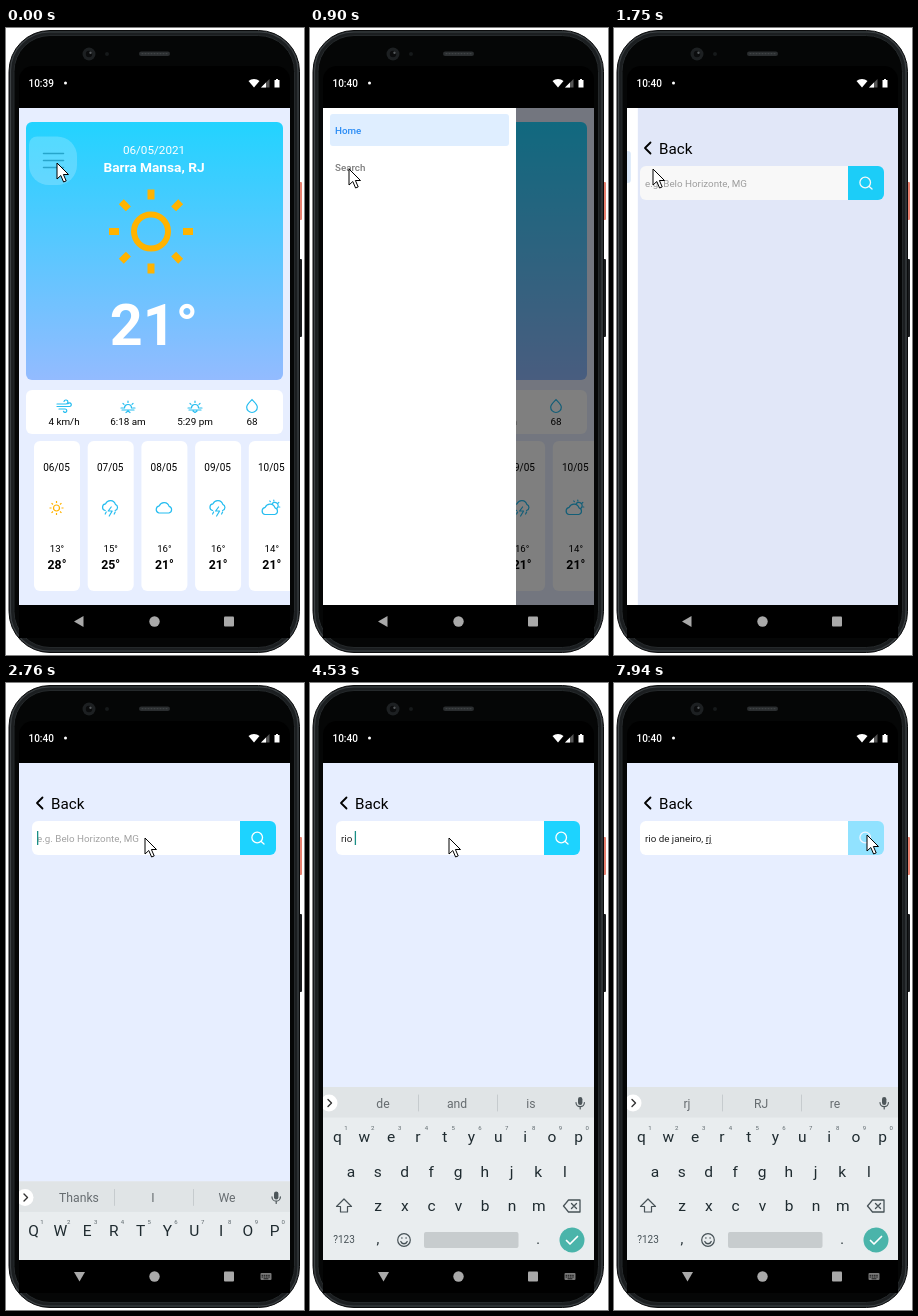
These frames come from a looping animation (298x627 px, 8000 ms). An HTML page:

```html
<!DOCTYPE html>
<html lang="en">
<head>
<meta charset="utf-8">
<title>Weather app</title>
<style>
  html, body { margin: 0; width: 100%; height: 100%; overflow: hidden; background: #fff; }
  svg { display: block; width: 298px; height: 627px; }
  text { font-family: Roboto, sans-serif; white-space: pre; }
  .mid { text-anchor: middle; }
  .bold { font-weight: 700; }
  .line { fill: none; stroke-linecap: round; stroke-linejoin: round; }
</style>
</head>
<body>
<svg id="stage" viewBox="0 0 298 627"></svg>
<script>
const LOOP = 8000;
const CYAN = '#1dd3ff', ICON = '#25bdf0', SUN = '#ffb300', PAGE = '#e7eeff', INK = '#1f2b30';

// Markup helpers
const text = (x, y, size, str, fill = '#000', cls = 'mid', extra = '') =>
  `<text x="${x}" y="${y}" font-size="${size}" fill="${fill}" class="${cls}" ${extra}>${str}</text>`;
const rect = (x, y, w, h, fill, rx = 0, extra = '') =>
  `<rect x="${x}" y="${y}" width="${w}" height="${h}" fill="${fill}" rx="${rx}" ${extra}/>`;
const line = (d, stroke, width = 1.2, extra = '') =>
  `<path class="line" d="${d}" stroke="${stroke}" stroke-width="${width}" ${extra}/>`;
const shape = (d, fill) => `<path d="${d}" fill="${fill}"/>`;
const at = (x, y, body) => `<g transform="translate(${x} ${y})">${body}</g>`;
const group = (id, body, extra = '') => `<g id="${id}" ${extra}>${body}</g>`;

// Ring with eight rays
const sun = (ring, ringWidth, from, to, rayWidth) => {
  let rays = '';
  for (let i = 0; i < 8; i++) {
    const c = Math.cos(i * Math.PI / 4), s = Math.sin(i * Math.PI / 4);
    rays += `M${c * from} ${s * from}L${c * to} ${s * to}`;
  }
  return `<circle r="${ring}" fill="none" stroke="${SUN}" stroke-width="${ringWidth}"/>
    <path d="${rays}" stroke="${SUN}" stroke-width="${rayWidth}"/>`;
};

const cloudPath = 'M-5 5H5A3.4 3.4 0 0 0 5.2 -1.6A5.2 5.2 0 0 0 -4.6 -2.2A3.7 3.7 0 0 0 -5 5Z';
const icons = {
  sun: sun(3, 1.2, 5, 7, 1.2),
  cloud: line(cloudPath, ICON),
  storm: line('M-5 2.5A3.4 3.4 0 0 1 -4.6 -4.2A5.2 5.2 0 0 1 5.2 -3.6A3.2 3.2 0 0 1 5 2.5', ICON) +
    line('M1 -1L-2 3H2L-1 8M-4 4L-5 6M5 4L4 6', ICON),
  partly: at(-1.5, 1.5, line(cloudPath, ICON)) +
    line('M1 -4.5A3.2 3.2 0 0 1 6 0M2.5 -8V-7M7.5 -5.5L6.8 -4.8M-1.5 -7L-1 -6.3M8.5 -1H7.8', ICON),
  wind: line('M-7 -2H2A2 2 0 1 0 0 -4.5M-7 0.5H5.5A1.8 1.8 0 1 0 4 -2.3M-5 3H1A1.7 1.7 0 1 1 -.5 5.3', ICON),
  rise: line('M-7 2H-4.5M4.5 2H7M-3.5 2A3.5 3.5 0 0 1 3.5 2M0 -5V-3.5M-5 -2.5L-4 -1.6M5 -2.5L4 -1.6M-6 4H6M-2 6.5L0 5L2 6.5', ICON),
  set: line('M-7 2H-4.5M4.5 2H7M-3.5 2A3.5 3.5 0 0 1 3.5 2M0 -5V-3.5M-5 -2.5L-4 -1.6M5 -2.5L4 -1.6M-6 4H6M-2 5L0 6.5L2 5', ICON),
  drop: line('M0 -6.5C2 -4 5.3 -2 5.3 1.2A5.3 5.3 0 0 1 -5.3 1.2C-5.3 -2 -2 -4 0 -6.5Z', ICON)
};

function phone() {
  return `
    ${rect(291, 154, 5, 38, '#e8806f', 1)}${rect(291, 231, 5, 78, '#1a1c1e', 1)}
    ${rect(3, 2.5, 290.5, 622, '#1b1e20', 41, 'stroke="#0a0b0c"')}
    ${rect(4.5, 4, 287.5, 619, 'none', 39, 'stroke="#3d4245" stroke-width="1.2"')}
    ${rect(8, 7.5, 280.5, 612, '#050606', 36, 'stroke="#25292b"')}
    ${rect(13, 38, 271, 572, '#000', 14)}
    <circle cx="83" cy="26" r="6.5" fill="#1d2022"/><circle cx="83" cy="26" r="3.2" fill="#0b0c0d"/>
    <circle cx="84.5" cy="24.8" r="1.2" fill="#55595c"/>
    <circle cx="101" cy="26" r="2" fill="#16191a"/>
    ${rect(133, 23.5, 31, 4.5, '#2a2d2f', 2.2)}${line('M136 25.7H161', '#45494b', 1, 'stroke-dasharray="1 2"')}
    ${text(22.5, 58.5, 10, '10:39', '#fff', '', 'id="clock" font-weight="500"')}
    <circle cx="59.5" cy="55" r="1.5" fill="#fff"/>
    ${shape('M248 59.5L242.5 53A8.6 8.6 0 0 1 253.5 53Z', '#fff')}
    ${shape('M255 59.5L263.500 51V59.5Z', '#555')}${shape('M255 59.5L260 54.500V59.5Z', '#fff')}
    ${shape('M268.500 52H270V51H272V52H273.500V59.5H268.500Z', '#fff')}`;
}

function home() {
  const stats = [[58, 'wind', '4 km/h'], [122, 'rise', '6:18 am'], [189, 'set', '5:29 pm'], [246, 'drop', '68']];
  const days = [['06', 'sun', 13, 28], ['07', 'storm', 15, 25], ['08', 'cloud', 16, 21], ['09', 'storm', 16, 21], ['10', 'partly', 14, 21]];
  return rect(13, 80, 271, 497, PAGE) + rect(20, 94, 257, 258, 'url(#sky)', 6) +
    group('menu', `<path d="M31 108.500H51A20 20 0 0 1 71 128.500V137A20 20 0 0 1 51 157H43A20 20 0 0 1 23 137V116.500A8 8 0 0 1 31 108.500Z" fill="#fff"/>` +
      line('M37.500 125.500H57.500M37.500 132.500H57.500M37.500 139.500H57.500', '#000', 1.5)) +
    text(148, 126, 11.7, '06/05/2021', '#fff') +
    text(148, 144, 13.7, 'Barra Mansa, RJ', '#fff', 'mid bold') +
    at(145, 203.5, sun(17, 6, 32, 42, 7)) +
    text(148, 317, 57.5, '21°', '#fff', 'mid bold') +
    rect(20, 362, 257, 44, '#fff', 6) +
    stats.map(([x, icon, label]) => at(x, 378, icons[icon]) + text(x, 397, 9.9, label)).join('') +
    days.map(([day, icon, low, high], i) => at(28 + i * 53.7, 413,
      rect(0, 0, 46, 150, '#fff', 6) + text(22.5, 30, 10, day + '/05') + at(22.5, 67, icons[icon]) +
      text(23, 111, 9.6, low + '°') + text(23, 127.5, 12.3, high + '°', '#000', 'mid bold'))).join('');
}

function search() {
  return rect(13, 80, 271, 497, PAGE) +
    line('M36.500 114.500L31 120L36.500 125.500', '#000', 1.8) +
    text(45, 125.500, 15.2, 'Back', '#000', '') +
    shape('M32 138H234V172H32A6 6 0 0 1 26 166V144A6 6 0 0 1 32 138Z', '#fff') +
    group('find', shape('M234 138H264A6 6 0 0 1 270 144V166A6 6 0 0 1 264 172H234Z', CYAN) +
      line('M256.500 154.500A5.300 5.300 0 1 1 245.900 154.500A5.300 5.300 0 1 1 256.500 154.500M255.200 158.500L258 161', '#fff', 1.3)) +
    text(31, 159, 9.8, 'e.g. Belo Horizonte, MG', '#a2a2a2', '', 'id="hint"') +
    text(31, 159, 9.8, '<tspan id="done"></tspan><tspan id="word" text-decoration="underline"></tspan>', '#222', '', 'id="query"') +
    rect(31, 148, 1.3, 14, '#1a8f86', 0, 'id="caret"');
}

function drawer() {
  return rect(13, 80, 193, 497, '#fff') +
    rect(20, 86, 179, 32, '#dfeeff', 3, 'id="homeItem"') +
    rect(20, 123, 179, 32, '#dfeeff', 3, 'id="searchItem"') +
    rect(20, 123, 179, 32, '#000', 3, 'id="ripple"') +
    text(25, 106, 9.8, 'Home', '#2b8cf5', '', 'id="homeLabel" font-weight="500"') +
    text(25, 143, 9.8, 'Search', '#7c7c7c', '', 'id="searchLabel" font-weight="500"');
}

function keyboard() {
  const key = (x, y, c) => text(x, y, 15.5, c, INK, 'mid key');
  const row = (letters, x, y, step) => [...letters].map((c, i) => key(x + i * step, y, c)).join('');
  return rect(13, 404, 271, 173, '#e9edef') + rect(13, 404, 271, 30.5, '#e0e4e6') +
    `<circle cx="19" cy="420" r="8.500" fill="#fff"/>` + line('M18 416.500L21.500 420L18 423.500', '#333', 1.4) +
    [73, 147, 221].map(x => text(x, 425, 12.2, '', '#666c70', 'mid tip')).join('') +
    line('M108.500 412V428M187.500 412V428', '#c6cbce', 1) +
    rect(268, 414, 4.4, 8, '#4d565a', 2.2) + line('M266 419.500A4.200 4.200 0 0 0 274.400 419.500M270.200 424V426', '#4d565a') +
    row('qwertyuiop', 27.5, 459, 26.8) +
    [...'1234567890'].map((c, i) => text(36 + i * 26.8, 447, 6, c, '#5c666b')).join('') +
    row('asdfghjkl', 41, 493.5, 26.75) + row('zxcvbnm', 68, 528, 26.8) +
    `<path id="shift" d="M34 516L41.500 523.500H37.500V529H30.500V523.500H26.500Z" stroke="#465156" stroke-width="1.2" stroke-linejoin="round"/>` +
    line('M253.500 523L258.500 517H270V529H258.500ZM261.500 520.500L266.500 525.500M266.500 520.500L261.500 525.500', '#465156', 1.3) +
    text(34, 560, 10, '?123', '#465156') + text(68, 561, 14, ',', INK) + text(228, 561, 14, '.', INK) +
    `<circle cx="94" cy="557" r="6.300" fill="none" stroke="#465156" stroke-width="1.200"/>` +
    line('M90.800 558.500A3.400 3.400 0 0 0 97.200 558.500M91.800 555H92M96 555H96.200', '#465156', 1.3) +
    rect(114, 549, 94.500, 16, '#c7ccce', 2) +
    `<circle cx="262" cy="557" r="12.500" fill="#4ab4aa"/>` + line('M256.500 557.500L260 561L267.500 553.500', '#fff', 1.7);
}

function navBar() {
  const grey = '#a9a9a9';
  return rect(13, 577, 271, 33, '#000') +
    group('back', shape('M68 593.500L77.500 588V599Z', grey)) +
    group('hide', shape('M68 589H79L73.500 598.500Z', grey)) +
    `<circle cx="148.500" cy="593.500" r="5.200" fill="${grey}"/>` + rect(218, 588.500, 10, 10, grey, 1) +
    group('switch', rect(254.500, 590, 11, 7, '#777', 1) + line('M256 592.300H264M256 594H264', '#000', .8, 'stroke-dasharray=".8 1.4"') + line('M258 595.800H262', '#000', .8));
}

stage.innerHTML = `
  <defs>
    <linearGradient id="sky" x2="0" y2="1"><stop stop-color="#22d3ff"/><stop offset="1" stop-color="#93bbff"/></linearGradient>
    <clipPath id="screen"><rect x="13" y="80" width="271" height="497"/></clipPath>
  </defs>` + phone() +
  `<g clip-path="url(#screen)">` + group('home', home()) + group('search', search()) +
  rect(13, 80, 271, 497, '#000', 0, 'id="shade"') + group('drawer', drawer()) + group('keyboard', keyboard()) + '</g>' +
  navBar() +
  group('pointer', `<path d="M0 0V16L3.800 12.500L6.600 19L9.200 17.900L6.400 11.500H11.500Z" fill="#fff" stroke="#000" stroke-linejoin="round"/>`);

// Timelines: [time, value, ...]
const POINTER = [[0, 51, 135], [480, 51, 135], [800, 41, 139], [890, 41, 139], [900, 39, 141], [1790, 39, 141],
  [2020, 139, 155], [6720, 139, 155], [6860, 267, 103], [7060, 267, 103], [7480, 253, 152]];
const DRAWER = [[120, 0], [180, .08], [300, .52], [420, .88], [540, 1], [1490, 1], [1570, .79], [1630, .513], [1690, .26], [1750, .057], [1810, 0]];
const MENU = [[0, .2], [80, .2], [300, 1]];
const RIPPLE = [[1380, 0], [1450, .19], [1640, .19], [1750, .03], [1800, 0]];
const KEYBOARD = [[2640, 175], [2760, 95], [2880, 25], [3000, 0]];
const FIND = [[7760, 1], [7940, .42]];
const QUERY = 'rio de janeiro, rj';
const STROKES = [3800, 4070, 4350, 4470, 4590, 4800, 4860, 5170, 5230, 5290, 5380, 5440, 5500, 5650, 5770, 6080, 6200, 6380];
const TIPS = [[0, 'Thanks', 'I', 'We'], [3800, 'r', 'R', 'are'], [4070, 'ri', 'RI', 'rid'], [4350, 'rio', 'Rio', 'rip'],
  [4470, 'de', 'and', 'is'], [4590, 'do', 'de', 'did'], [4800, 'de', 'De', 'dear'], [4860, 'la', 'janeiro', 'los'],
  [5170, 'just', 'j', 'Janeiro'], [5290, 'jan', 'Jan', 'January'], [5380, 'jane', 'Jane', 'Janet'],
  [5440, 'janei', 'Janeiro', 'Janeiros'], [5650, 'janeiro', 'Janeiro', 'Janeiros'], [5770, 'to', 'I', 'you'], [6380, 'rj', 'RJ', 're']];

function tween(table, t, col = 1) {
  const next = table.findIndex(row => row[0] > t);
  if (next < 0) return table[table.length - 1][col];
  if (next === 0) return table[0][col];
  const a = table[next - 1], b = table[next];
  return a[col] + (b[col] - a[col]) * (t - a[0]) / (b[0] - a[0]);
}

const el = id => document.getElementById(id);
const set = (id, name, value) => el(id).setAttribute(name, value);
const show = (id, on) => set(id, 'visibility', on ? 'visible' : 'hidden');
const write = (node, str) => { if (node.textContent !== str) node.textContent = str; };
const keys = [...document.querySelectorAll('.key')], tips = [...document.querySelectorAll('.tip')];

function render(t) {
  const searching = t >= 1500, open = tween(DRAWER, t), rise = tween(KEYBOARD, t);
  const typing = t >= 2700, caps = t < 3860;
  write(el('clock'), t < 400 ? '10:39' : '10:40');
  show('home', !searching);
  show('search', searching);
  set('menu', 'opacity', tween(MENU, t));

  set('drawer', 'transform', `translate(${(open - 1) * 193} 0)`);
  set('shade', 'opacity', open * .5);
  show('homeItem', !searching);
  set('searchItem', 'opacity', searching ? 1 : 0);
  set('ripple', 'opacity', tween(RIPPLE, t));
  set('homeLabel', 'fill', searching ? '#7c7c7c' : '#2b8cf5');
  set('searchLabel', 'fill', searching ? '#2b8cf5' : '#7c7c7c');

  set('keyboard', 'transform', `translate(0 ${rise})`);
  show('back', !typing);
  show('hide', typing);
  show('switch', typing);
  keys.forEach(k => write(k, caps ? k.textContent.toUpperCase() : k.textContent.toLowerCase()));
  set('shift', 'fill', caps ? '#465156' : 'none');
  const tip = TIPS.filter(row => row[0] <= t).pop();
  tips.forEach((node, i) => write(node, tip[i + 1]));

  const count = STROKES.filter(s => s <= t).length, typed = QUERY.slice(0, count);
  const split = typed.search(/[a-z]*$/);
  write(el('done'), typed.slice(0, split));
  write(el('word'), typed.slice(split));
  set('hint', 'opacity', count ? 0 : 1);
  const since = t - (count ? STROKES[count - 1] : 2640);
  set('caret', 'opacity', since >= 0 && Math.floor(since / 500) % 2 === 0 ? 1 : 0);
  set('caret', 'x', 31 + (count ? el('query').getComputedTextLength() : 0));
  set('find', 'opacity', tween(FIND, t));

  set('pointer', 'transform', `translate(${tween(POINTER, t)} ${tween(POINTER, t, 2)})`);
}

const start = performance.now();
function tick() {
  render((performance.now() - start) % LOOP);
  requestAnimationFrame(tick);
}
tick();
</script>
</body>
</html>
```
